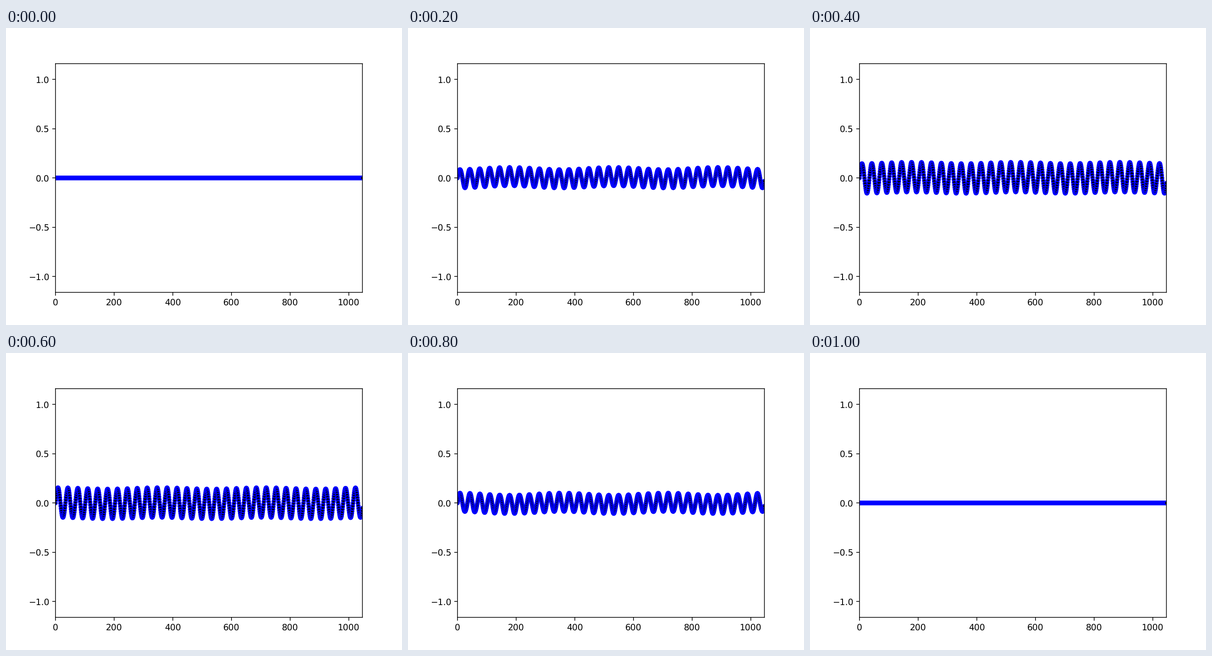
These frames come from a looping animation (864x648 px, 1.2 s). A matplotlib script:

```python
import numpy as np
import matplotlib.pyplot as plt
from matplotlib.animation import FuncAnimation

FRAMES = 6
LOOP_MS = 1200
POINTS = 1048

K = 0.1857        # wave number of the main standing wave
BEAT = 0.0177     # slow drift of the overtone against it
MAIN, OVERTONE = 0.159, 0.0115

x = np.arange(POINTS)
main_shape = MAIN * np.sin(K * x)
overtone_shape = OVERTONE * (
    0.30 + 0.35 * np.cos((2 * K - BEAT) * x) - 0.65 * np.cos(BEAT * x)
)


def displacement(frame):
    phase = np.pi * frame / (FRAMES - 1)
    return main_shape * np.sin(phase) + overtone_shape * np.sin(2 * phase)


plt.rcParams.update({
    "font.family": "DejaVu Sans",
    "text.hinting": "none",
    "path.snap": False,
})
fig, ax = plt.subplots(figsize=(6.4, 4.8), dpi=135)
ax.set_xlim(0, POINTS - 1)
ax.set_ylim(-1.16, 1.16)
ax.set_yticks([-1, -0.5, 0, 0.5, 1])

# One size per bead keeps their positions from being rounded to whole pixels.
beads = ax.scatter(
    x, displacement(0), s=np.full(POINTS, 4.1 ** 2),
    facecolor="black", edgecolor="blue", linewidth=1.15,
)


def update(frame):
    beads.set_offsets(np.column_stack([x, displacement(frame)]))
    return beads,


anim = FuncAnimation(fig, update, frames=FRAMES, interval=LOOP_MS / FRAMES,
                     repeat=True, repeat_delay=0)
plt.show()
```
